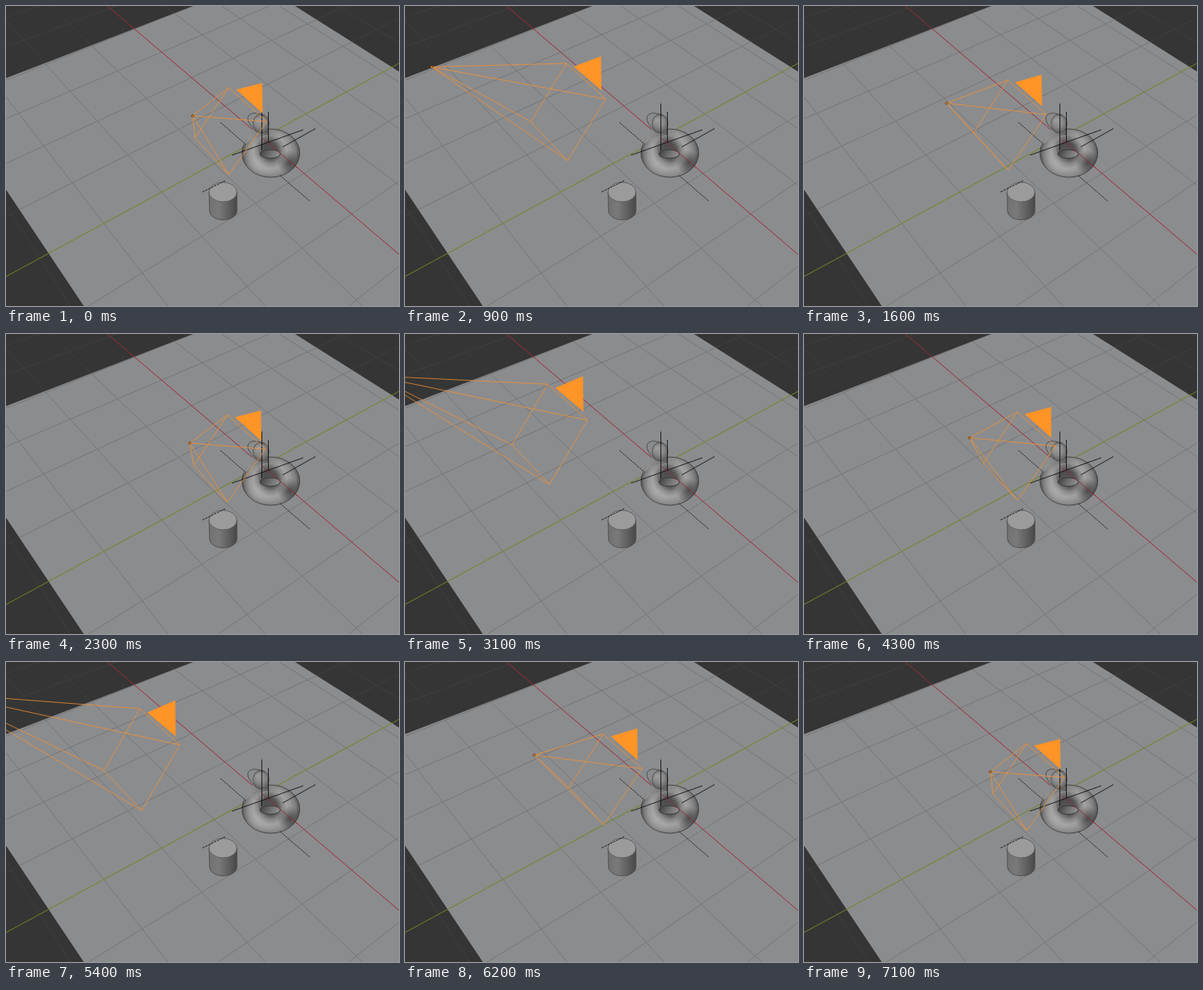
Recreate the animation shown at these times as an HTML page with a canvas. Size 480x366 px, loop 7200 ms.

```html
<!DOCTYPE html>
<html>
<head>
<meta charset="utf-8">
<style>
html, body { margin: 0; width: 100%; height: 100%; overflow: hidden; background: #353535; }
canvas { display: block; }
</style>
</head>
<body>
<canvas id="stage" width="480" height="366"></canvas>
<script>
const ctx = document.getElementById('stage').getContext('2d');
const LOOP = 7200, STEP = 100;
const CYCLE = 2370, SWEEP = 2290, START = 75;
const UNIT = 0.108;

function trace(points, close) {
  ctx.beginPath();
  points.forEach(([x, y], i) => i ? ctx.lineTo(x, y) : ctx.moveTo(x, y));
  if (close) ctx.closePath();
}
function line(x1, y1, x2, y2, color, width = 1, dash = []) {
  trace([[x1, y1], [x2, y2]]);
  ctx.setLineDash(dash);
  paint(null, color, width);
  ctx.setLineDash([]);
}
function oval(x, y, rx, ry) {
  ctx.beginPath();
  ctx.ellipse(x, y, rx, ry, 0, 0, Math.PI * 2);
}
function paint(fill, stroke, width = 1) {
  if (fill) { ctx.fillStyle = fill; ctx.fill(); }
  if (stroke) { ctx.strokeStyle = stroke; ctx.lineWidth = width; ctx.stroke(); }
}
function ramp(gradient, colors) {
  colors.forEach((c, i) => gradient.addColorStop(i / (colors.length - 1), c));
  return gradient;
}
function glow(x, y, radius, color, fade) {
  oval(x, y, radius, radius);
  paint(ramp(ctx.createRadialGradient(x, y, 0, x, y, radius), [color, fade]));
}

// Perspective projection of a ground point, in grid units.
function ground(a, b) {
  a *= UNIT;
  b *= UNIT;
  const z = 1 + 0.554 * a + 0.4142 * b;
  return [240 + 678 * (0.1072 - 0.599 * a + 0.801 * b) / z,
          183 + 678 * (-0.033 - 0.5784 * a - 0.4325 * b) / z];
}
function grid(color) {
  for (let i = -7; i <= 7; i++) {
    if (!i) continue;
    line(...ground(i, -7), ...ground(i, 8), color);
    line(...ground(-7, i), ...ground(8, i), color);
  }
}

function drawFloor() {
  ctx.fillStyle = '#353535';
  ctx.fillRect(0, 0, 480, 366);
  grid('#3e3e3e');
  ctx.save();
  trace([[0, 88], [229, 0], [353, 0], [480, 80], [480, 366], [95, 366], [0, 224]], true);
  paint('#8b8c8e');
  ctx.clip();
  grid('#767778');
  ctx.restore();
  line(0, 330, 480, 70, '#6f8523');
  line(124, 0, 480, 303, '#a02c38');
}

function drawCylinder() {
  ctx.beginPath();
  ctx.moveTo(248, 227);
  ctx.lineTo(248.5, 250);
  ctx.ellipse(265.3, 250, 16.8, 11, 0, Math.PI, 0, true);
  ctx.lineTo(282, 227);
  ctx.closePath();
  paint(ramp(ctx.createLinearGradient(248, 0, 282, 0), ['#707070', '#7a7a7a', '#626262', '#484848']), '#444', 0.7);
  oval(265, 227, 17, 12);
  paint('#9b9b9b', '#4c4c4c', 0.7);
}

function drawRing() {
  oval(323.5, 179.5, 35.3, 29.5);
  const tube = ctx.createRadialGradient(322, 177, 10, 323.5, 179.5, 36);
  paint(ramp(tube, ['#555', '#868686', '#a2a2a2', '#949494', '#7c7c7c', '#4c4c4c']), '#3a3a3a', 0.8);
  ctx.save();
  ctx.clip();
  glow(308, 192, 18, 'rgba(185,185,185,.4)', 'rgba(185,185,185,0)');
  glow(346, 191, 15, 'rgba(40,40,40,.65)', 'rgba(40,40,40,0)');
  glow(318, 163, 17, 'rgba(55,55,55,.4)', 'rgba(55,55,55,0)');
  ctx.restore();

  oval(322.5, 180.5, 12.5, 5.2);
  paint(ramp(ctx.createLinearGradient(310, 175, 330, 186), ['#3a3a3a', '#666', '#8b8c8e']), '#3c3c3c', 1);
}

function drawFigure() {
  ctx.beginPath();
  ctx.moveTo(302, 147);
  ctx.bezierCurveTo(302, 156, 294, 160, 290, 170);
  ctx.bezierCurveTo(299, 162, 308, 158, 321, 157);
  ctx.lineTo(321, 148);
  ctx.closePath();
  paint(ramp(ctx.createLinearGradient(296, 0, 322, 0), ['#919191', '#808080', '#555']));

  oval(311.5, 143.5, 9.8, 11.5);
  paint(ramp(ctx.createRadialGradient(308, 139, 1, 312, 144, 13), ['#9c9c9c', '#858585', '#515151']), '#4c4c4c', 0.7);
  ctx.beginPath();
  ctx.moveTo(306, 153);
  ctx.bezierCurveTo(297, 146, 293, 137, 297, 133);
  ctx.bezierCurveTo(301, 129, 309, 131, 315, 134);
  paint(null, '#4a4a4a', 0.9);
}

function drawAxes() {
  const ink = 'rgba(15,15,15,.85)';
  line(240, 227, 268, 213, ink, 1, [3, 1]);
  line(338, 172, 378, 149.5, ink);
  line(262, 142, 293, 169, ink, 1, [2, 1]);
  line(335, 207, 371, 238, ink, 1, [2, 1]);
  line(276, 182, 363, 151, ink);
  line(312.5, 119, 312.5, 176, ink);
  line(320.5, 129, 320.5, 167, ink);
  line(313, 161, 356, 197.5, 'rgba(155,35,48,.75)');
}

// Lens and distance shrink together; the sweep then restarts abruptly.
function travel(time) {
  const phase = (time - START + CYCLE) % CYCLE;
  const x = Math.max(0, 1 - phase / SWEEP);
  return 56 * x + 70 * x ** 3 + 116 * x ** 4;
}

function drawCamera(s) {
  const at = (x, y, kx, ky) => [x - kx * s, y - ky * s];
  const corners = [at(272, 99.5, 1.02, 0.4), at(318.5, 141, 1, 0.375),
                   at(272, 205.5, 1, 0.23), at(231, 161, 1.05, 0.27)];
  const apex = [228 - 2.23 * s - 0.0058 * s * s, 134 - 0.62 * s - 0.0026 * s * s];
  const orange = 'rgba(245,145,48,.85)';
  trace(corners, true);
  paint(null, orange, 0.9);
  corners.forEach(c => line(...apex, ...c, orange, 0.9));
  trace([at(281, 102, 1.02, 0.38), at(313.5, 131, 1, 0.38), at(313, 94, 1, 0.445)], true);
  paint('#ff9427');
  oval(...apex, 1.4, 1.4);
  paint('#f59331', '#4a2d10', 0.8);
}

function frame(now) {
  const time = Math.floor(now % LOOP / STEP) * STEP;
  drawFloor();
  drawCylinder();
  drawRing();
  drawFigure();
  drawAxes();
  drawCamera(travel(time));
}

let begin;
function tick(now) {
  begin ??= now;
  frame(now - begin);
  requestAnimationFrame(tick);
}
requestAnimationFrame(tick);
</script>
</body>
</html>
```
